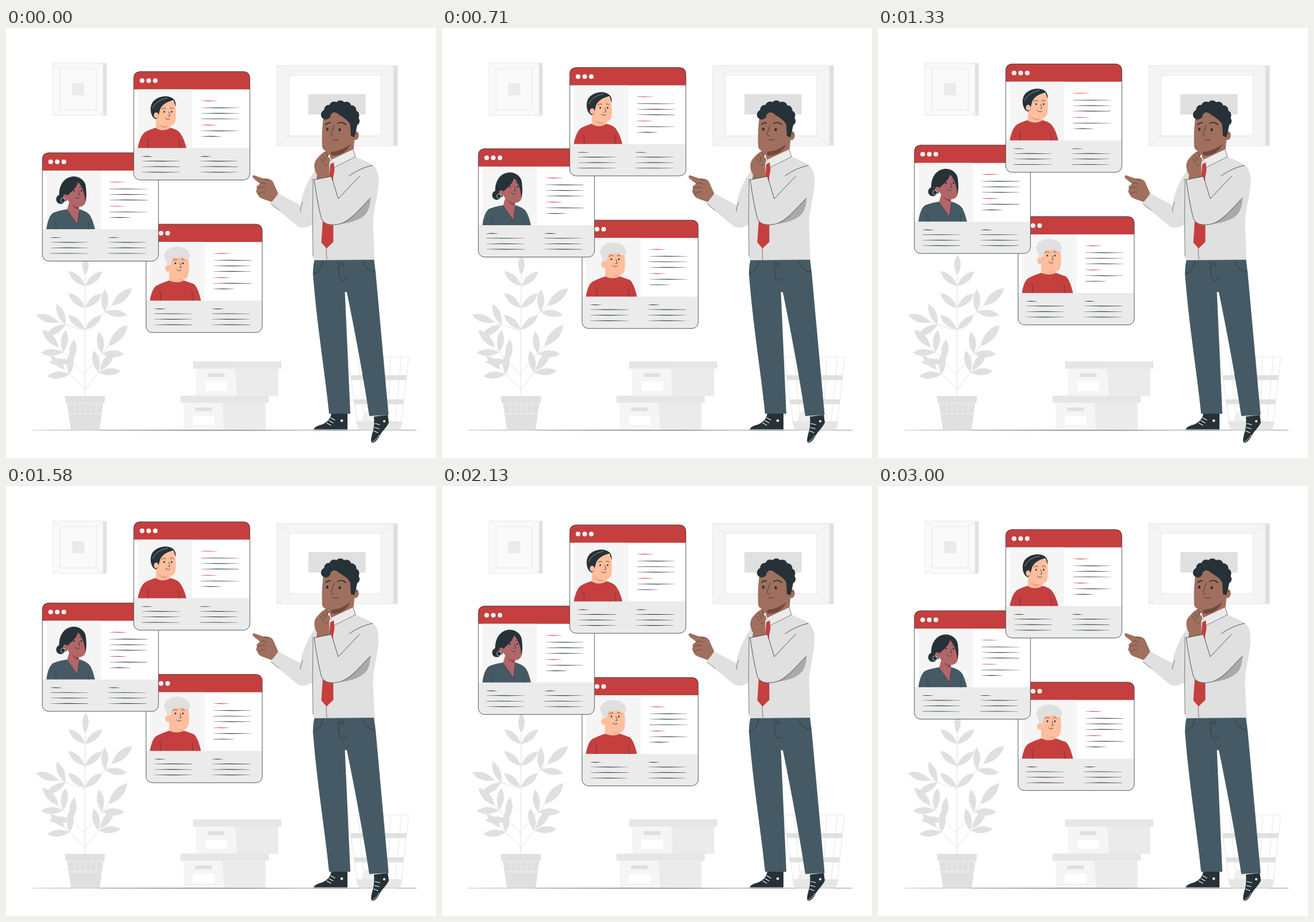
These frames come from a looping animation (748 px wide and 748 px high, 3040 ms). An HTML page:

```html
<!DOCTYPE html>
<html lang="en">
<head>
<meta charset="utf-8">
<title>Choosing a candidate</title>
<style>
  html, body { margin: 0; width: 100%; height: 100%; overflow: hidden; background: #fff; }
  svg { display: block; width: 100%; height: 100%; }
  .ink { fill: none; stroke: #263238; stroke-width: .8; stroke-linecap: round; stroke-linejoin: round; }
  .fine { stroke-width: .6; }
  .faint { fill: none; stroke: #e6e6e6; stroke-width: 1; }
  .red { fill: #c53f3f; }
  .dark { fill: #263238; }
  .slate { fill: #455a64; }
  .shirt { fill: #e0e0e0; }
  .brown { fill: #a06f5d; }
  .peach { fill: #ffbe9d; }
  .rose { fill: #b16668; }
</style>
</head>
<body>
<svg viewBox="0 0 748 748">
  <g id="room"></g>

  <!-- standing man -->
  <g>
    <path class="dark" d="M566 669H594V699.500H535.500C535 695 541 692 549 690C558 686 565 681 566 669ZM640 676L664 673L666 686C663 694 655 700 650 709C646 717 641 722 637 721.500C634 720 635 714 637 706C640 697 641 688 640 676Z"/>
    <path d="M536 698.500H594M637 720Q643 718 649 708" fill="none" stroke="#fff" stroke-width=".8"/>
    <path d="M558 687L565 691M562 683L569 687M565 678L572 682M640 701L647 704M641 695L649 697M642 688L650 690" stroke="#fff" stroke-width="1.100" stroke-linecap="round"/>
    <circle cx="584" cy="683" r="2.300" fill="#fff"/><circle cx="658" cy="684" r="2" fill="#fff"/>
    <path class="slate" d="M537 402H640L643 425L665.500 673L632 675Q617 577 593 460L589.500 459L599 671H562C555 600 541 520 534 428Q534 412 537 402Z"/>
    <path class="ink" d="M534 428Q548 424 551 405M621 406Q624 422 641 424M579 405C578 420 578 432 582 438Q587 442 594 434"/>
    <circle class="ink" cx="584.500" cy="411.500" r="2.800"/>

    <!-- pointing arm -->
    <path class="brown" d="M429 259Q429 255 434 257L448 262C457 261 464 264 466 271L474 289L462 303C452 298 439 297 438 289C435 286 434 283 437 280C434 277 437 274 442 271L432 263Q429 261 429 259Z"/>
    <path class="ink fine" d="M442 271Q449 268 453 271M437 280Q444 275 451 278M438 289Q445 284 451 285M448 262L455 265"/>
    <path class="shirt" d="M566 228L606 218L608 224Q628 232 638 238C646 246 649 256 648 272C646 300 636 325 639 352L641 403L536 404Q533 399 534 380L533 342C522 349 512 349 505 343L460.500 306L473.500 288L512 308C515 290 524 264 540 245Z"/>
    <path class="ink fine" d="M534 262C534 295 533 325 533.500 350L534 397M512 319Q512 312 516 303M557 383L558 403M461 306L475 317"/>

    <!-- head -->
    <path class="brown" d="M560 213L607 185L604 217L568 236Z"/>
    <path d="M563 214C575 215 588 211 599 202C593 216 580 223 567 222Z" fill="#70493d"/>
    <ellipse class="brown" cx="607.500" cy="187" rx="6.200" ry="8"/>
    <path class="ink fine" d="M605 188Q607 181 611 184"/>
    <path class="brown" d="M553 150C550 168 549 186 550 206Q551 215 565 215C583 215 598 205 603 187V150L580 138Z"/>
    <path class="dark" d="M554 157L556 140L575 131L600 135L610 150C614 164 609 178 606 190L600 188L599 169C596 160 586 156 577 149C570 144 563 148 554 157Z"/>
    <g id="hair" class="dark"></g>
    <path class="ink" style="stroke-width:1.800" d="M556 168Q559 164 564 165M577 166Q584 162 591 168"/>
    <ellipse class="dark" cx="559" cy="176" rx="2.100" ry="2.700"/><ellipse class="dark" cx="580.500" cy="177" rx="2.100" ry="2.700"/>
    <path class="ink" d="M571 169Q568 178 565 185Q566 188 570 188M568 194Q573 196 578 194"/>

    <path d="M566 229L604 211L608 224L570 244Z" fill="#ebebeb"/>
    <path class="ink fine" d="M604 212L608 224L570 243V235"/>
    <path class="red" d="M564 237L570 234L571.500 247L569 260L569.500 372L557.500 383.500L548.500 373L551 335L562 270Z"/>

    <!-- thinking arm -->
    <path class="brown" d="M540 264L541 255C534 244 535 232 543 225C547 220 551 217 556 214C560 210 566 209 567 213C568 217 560 221 560 224C565 226 565 231 562 235L563 260Z"/>
    <path class="ink fine" d="M550 221Q556 224 555 231M556 215Q560 219 558 225M546 226Q551 228 551 235M562 235Q558 240 555 239"/>
    <path class="shirt" d="M536 264L566 258L578 297L629 245C644 240 650 257 647 275L634 296C616 316 594 341 580 341C565 345 553 342 549 332Q541 302 536 264Z"/>
    <path d="M581 340.500C600 334 617 313 634 296Q634 308 629 319C622 331 604 339 581 340.500Z" fill="#a9a9a9"/>
    <path class="ink" d="M615 258L578 297L566 258L536 264C540 290 544 315 549 332C553 342 565 344 580 341C600 336 616 313 634 296M637 239Q617 243 597 257"/>
  </g>

  <g id="cards"></g>
</svg>
<script>
  const $ = id => document.getElementById(id);
  const repeat = (n, f) => Array.from({ length: n }, (_, i) => f(i)).join("");
  const dot = (x, y, r) => `<circle cx="${x}" cy="${y}" r="${r}"/>`;

  // curls set along an elliptic arc, angles in half turns
  const curls = (cx, cy, rx, ry, r, from, to, n) => repeat(n, i => {
    const a = Math.PI * (from + (to - from) * i / (n - 1));
    return dot(cx + rx * Math.cos(a), cy + ry * Math.sin(a), r);
  });

  // stroke that tapers at both ends
  const rule = (x, y, w, color = "#263238", h = .6) =>
    `<path fill="${color}" d="M${x} ${y - .15}L${x + w * .4} ${y - h}L${x + w} ${y - .1}V${y + .2}L${x + w * .55} ${y + h}L${x} ${y + .15}Z"/>`;

  // wall frame with mitred corners
  function frame(x, y, w, h, rim, depth, fill, inner) {
    const corner = (sx, sy) => {
      const px = x + sx * w, py = y + sy * h;
      return `M${px} ${py}l${rim * (1 - 2 * sx)} ${rim * .8 * (1 - 2 * sy)}`;
    };
    return `<path fill="#e0e0e0" d="M${x + w} ${y}h${depth}v${h}h${-depth}z"/>
      <path class="faint" style="fill:${fill}" d="M${x} ${y}h${w}v${h}h${-w}z"/>
      <path class="faint" style="fill:${inner}" d="M${x + rim} ${y + rim * .8}h${w - 2 * rim}v${h - 1.6 * rim}h${2 * rim - w}z"/>
      <path class="faint" d="${corner(0, 0) + corner(1, 0) + corner(0, 1) + corner(1, 1)}"/>`;
  }

  function leaf(x, y, angle, length) {
    const c = Math.cos(angle) * length, s = Math.sin(angle) * length;
    const bend = side => `${c * .55 - s * .31 * side} ${s * .55 + c * .31 * side}`;
    return `<path d="M${x} ${y}q${bend(1)} ${c} ${s}q${c * -.45 - s * .31 * -1} ${s * -.45 + c * .31 * -1} ${-c} ${-s}z"/>`;
  }
  // twig with a leaf at its end and pairs of leaves behind it
  function twig(x, y, dx, dy, pairs, gap, end = 42) {
    const a = Math.atan2(dy, dx), len = Math.hypot(dx, dy);
    const pair = i => {
      const t = 1 - (i + .5) * gap / len, px = x + dx * t, py = y + dy * t;
      return leaf(px, py, a - .85, 39) + leaf(px, py, a + .85, 39);
    };
    return `<path d="M${x} ${y}l${dx} ${dy}" stroke="#e0e0e0"/>` + leaf(x + dx, y + dy, a, end) + repeat(pairs, pair);
  }
  const plant = `<g fill="#e0e0e0"><path d="M137 640V525" stroke="#e0e0e0"/>
    ${twig(137, 525, 1, -95, 3, 38, 36)}
    ${twig(137, 527, -45, -15, 1, 24)}${twig(137, 524, 46, -40, 1, 30, 48)}
    ${twig(137, 605, -45, -49, 2, 22)}${twig(137, 600, 41, -46, 1, 34, 50)}
    ${twig(137, 628, -35, -34, 1, 24, 34)}${twig(137, 630, 26, -34, 1, 8)}
    <path d="M102 640H172.500L171 653H169L163 699.500H113L106 653H104Z"/></g>
    <path d="M105 653H170M108 671H167${repeat(5, i => `M${118 + 10 * i} 653L${120 + 9 * i} 671`)}" fill="none" stroke="#f5f5f5" stroke-width=".8"/>`;

  const box = (x, y, h) => `<g transform="translate(${x} ${y})">
    <path d="M6 12H148V${h}H6Z" fill="#ebebeb"/>
    <path d="M6 12H73L76 ${h}H6Z" fill="#f5f5f5"/>
    <path d="M0 0H153.500V12.500H0Z" fill="#e6e6e6"/>
    <path d="M25.500 20.500H54.500V27H25.500Z" fill="#e0e0e0"/>
    <path d="M21.500 35.500H59V51H21.500Z" fill="#fff"/></g>`;

  const basket = `<path d="M609 684H690L687 694Q685 699 680 699H620Q613 699 612 694Z" fill="#e6e6e6"/>
    <path d="M618 684L624 668L640 662L652 667L662 684Z" fill="#f0f0f0"/>
    <path class="faint" d="M595 572H700.500L687 694Q685 699 680 699H620Q613 699 612 694L595 572${repeat(5, i => `M${612 + 19 * i} 572L${625 + 12.7 * i} 698`)}"/>
    <path d="M599 604H697L696 612.500H600ZM604 646H692L691 654.500H606Z" fill="#e0e0e0"/>`;

  $("room").innerHTML = frame(82, 61, 87, 91, 12, 6, "#fafafa", "#fafafa")
    + `<path d="M115 96h21v21h-21z" fill="#ebebeb"/>`
    + frame(471, 65, 203, 140, 22, 7.5, "#f5f5f5", "#fff")
    + `<path d="M526 115h99.500v35.500h-99.500z" fill="#e0e0e0"/>`
    + rule(45, 699.7, 669, "#263238", .5)
    + plant + box(325.5, 580, 60) + box(303.5, 639.5, 59.5) + basket;
  $("hair").innerHTML = curls(581, 158, 26, 23.5, 8.5, 1.1, 2.05, 8);

  // small face shared by the portraits
  const face = (x, y) => `<g transform="translate(${x} ${y})">
    <ellipse class="dark" cx="-6" cy="-4" rx="1.300" ry="1.700"/><ellipse class="dark" cx="7" cy="-4" rx="1.300" ry="1.700"/>
    <path class="ink" d="M-10 -9Q-6 -12 -3 -10M4 -10Q8 -12 10 -9M2 -4L4 3L1 4M-4 7Q0 11 4 8"/></g>`;

  const darkHaired = `
    <path class="peach" d="M39 78L64 84V98Q51 108 38 99Z"/>
    <path class="red" d="M7 133C10 118 14 108 22 104Q30 100 38 98Q50 106 64 98C72 100 79 103 82 109Q88 118 91.500 133Z"/>
    <path d="M41 89Q48 97 60 95L56 98Q46 98 41 89Z" fill="#eb9a78"/>
    <path class="peach" d="M38 62L45 52Q60 47 71 54C74 68 74 80 72 88Q68 96 58 95C48 94 41 88 39 80Z"/>
    <path class="dark" d="M38 83L34 80C28 73 28 60 33 53C40 44 54 41 62 44C70 46 74 52 73 61L69 50C58 52 47 58 45 69L42 80Z"/>
    <path d="M33 64C37 54 47 48 59 46" fill="none" stroke="#fff" stroke-width=".5"/>
    <ellipse class="peach" cx="39" cy="76" rx="4" ry="5"/>
    ${face(59, 74)}
    <path class="ink fine" d="M24 117Q26 124 25 133M78 119L80 133"/>`;

  const bunHaired = `
    <path class="slate" d="M7 133C9 120 12 108 20 104Q34 99 47 98H64Q78 102 83 109Q88 117 91.500 133Z"/>
    <path class="rose" d="M48 82L63 90L64 102L61 125L43 99Z"/>
    <path d="M50 88Q55 95 64 94L63 99Q54 97 50 88Z" fill="#8f4a50"/>
    <path class="rose" d="M42 60L52 47Q66 45 74 54C77 69 77 82 74 89Q70 95 62 94C52 92 44 85 42 78Z"/>
    <circle class="dark" cx="32" cy="81" r="8"/>
    <path class="dark" d="M30 82C27 64 33 48 46 43C58 38 71 44 75 55C77 66 77 78 75 86C74 74 71 60 62 51C60 61 50 68 44 74L42 84Z"/>
    <ellipse class="rose" cx="40" cy="77" rx="4" ry="4.800"/>
    <circle cx="36" cy="82.500" r="4" fill="none" stroke="#e0e0e0" stroke-width=".8"/>
    ${face(61, 70)}
    <path class="ink fine" d="M43 99L61 125L64 102M21 118Q25 125 24 133M80 120L81 133"/>`;

  const greyHaired = `
    <path class="peach" d="M40 82L66 86V101Q54 106 40 99Z"/>
    <path class="red" d="M6.500 133C9 120 12 111 18 107Q30 101 40 98Q54 104 66 98L83 104C89 109 93 122 95.500 133Z"/>
    <path d="M50 91Q58 97 66 95Q59 101 50 91Z" fill="#eb9a78"/>
    <path class="peach" d="M40 56L52 48L72 51C75 64 76 82 73 90Q70 97 61 96C50 95 42 89 40 80Z"/>
    <ellipse class="peach" cx="38" cy="77" rx="5" ry="6"/>
    <g fill="#e0e0e0">${curls(54, 55, 16.5, 10.5, 6.2, .85, 2, 8)}<path d="M33 57L44 46H68L72 54Q56 60 46 58L43 70L37 72Z"/></g>
    ${face(57, 72)}
    <path class="ink fine" d="M24 116Q27 124 25 133M80 119L82 133"/>`;

  // heading with lines of text below it
  const para = (x, y, first, n, head, color, last = 66) => rule(x, y, head, color)
    + repeat(n, i => rule(x, first + 9.6 * i, i < n - 1 ? 66 : last));

  function card(x, y, portrait) {
    return `<g transform="translate(${x} ${y})">
      <rect width="202" height="188.500" rx="11" fill="#fff"/>
      <path class="red" d="M0 31V11Q0 0 11 0H191Q202 0 202 11V31Z"/>
      <path d="M7 31H102V133H7Z" fill="#f5f5f5"/>
      <path d="M0 133H202V177.500Q202 188.500 191 188.500H11Q0 188.500 0 177.500Z" fill="#ebebeb"/>
      <g fill="#fff">${repeat(3, i => dot(14.5 + 11.5 * i, 15.8, 4))}</g>
      ${portrait}
      ${para(117, 51, 63, 3, 28, "#d03a3a")}${para(117, 93, 103, 2, 28, "#d03a3a", 36)}
      ${para(14, 147.5, 155.8, 3, 19)}${para(115, 147.5, 155.8, 3, 19)}
      <rect class="ink" width="202" height="188.500" rx="11"/></g>`;
  }
  $("cards").innerHTML = card(243.7, 341.2, greyHaired) + card(63.2, 217, bunHaired) + card(222.2, 75.8, darkHaired);

  // cards float up and back at constant speed, stepped at 24 pictures a second
  const LOOP = 3040, STEP = 1000 / 24, PERIOD = 3000, PHASE = 30, RISE = 14.96;
  const lift = ms => {
    const p = ((ms + PHASE) % PERIOD) / PERIOD;
    return RISE * (1 - Math.abs(1 - 2 * p));
  };
  const start = performance.now();
  function draw() {
    const t = (performance.now() - start) % LOOP;
    const held = Math.min(72, Math.floor((t + 5) / STEP)) * STEP;
    $("cards").setAttribute("transform", `translate(0 ${(lift(0) - lift(held)).toFixed(2)})`);
    requestAnimationFrame(draw);
  }
  draw();
</script>
</body>
</html>
```
